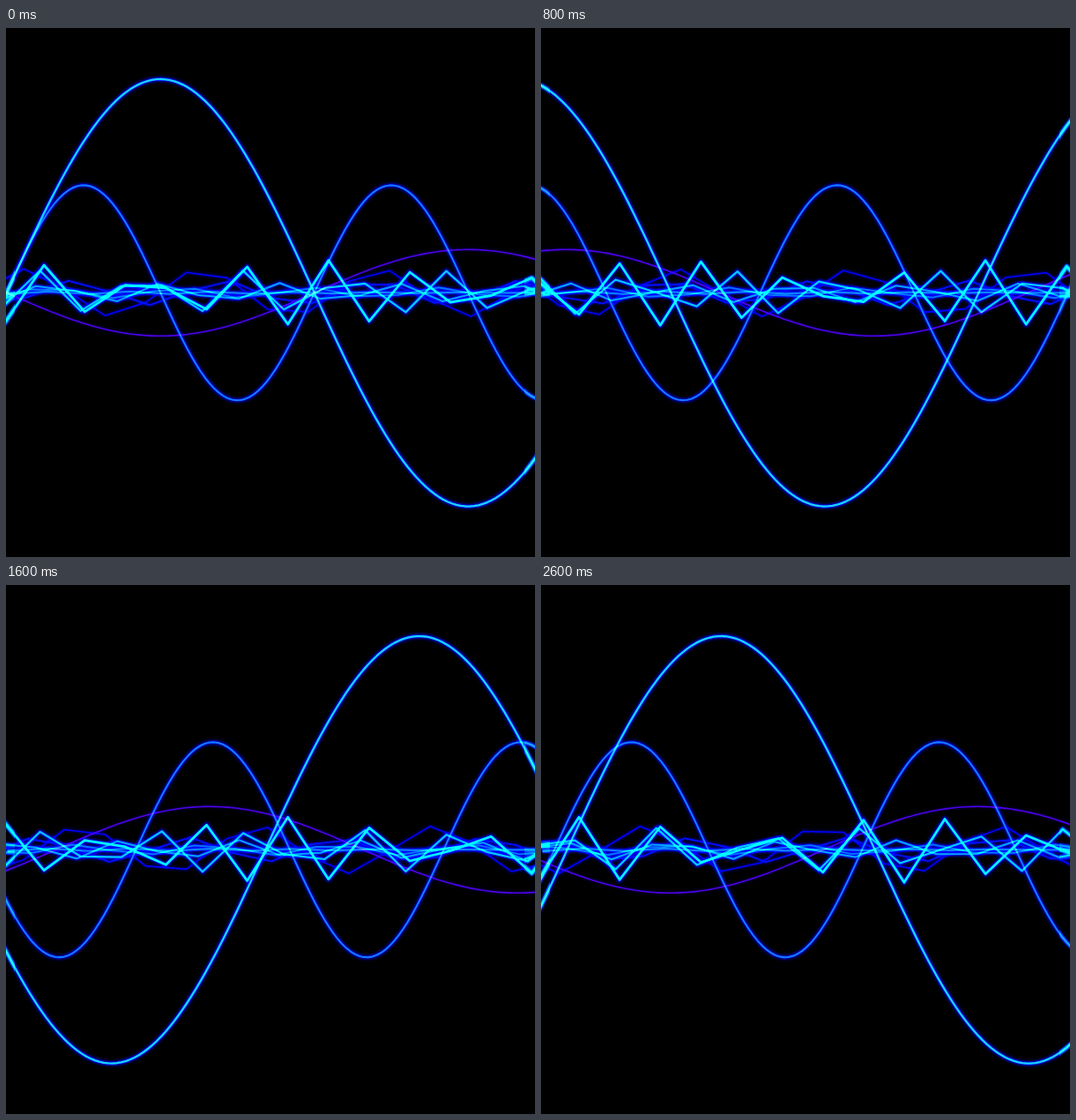
Write an HTML page that moves like this. It is 600 px wide and 600 px high and loops after 2.66 s.

```html
<!DOCTYPE html>
<html lang="en">
<head>
<meta charset="utf-8">
<title>Waves</title>
<style>
  html, body { margin: 0; width: 100%; height: 100%; overflow: hidden; background: #000; }
  svg { display: block; width: 100vw; height: 100vh; }
  path { fill: none; stroke-linejoin: round; mix-blend-mode: plus-lighter; }
</style>
</head>
<body>
<svg id="stage" viewBox="0 0 600 600">
  <clipPath id="edges"><path d="M0 0H10V600H0ZM588 0H600V600H588Z"/></clipPath>
</svg>
<script>
const stage = document.getElementById('stage');
const LOOP = 2660, MID = 300.3, TAU = Math.PI * 2;
const SMOOTH_RATE = 0.14006, COARSE_RATE = 0.1335;
const GAP = 46.1;

// Smooth waves: amplitude, wavelength, direction
const smooth = [
  { amp: 49, len: 698, dir: -1, color: '#5000c8', width: 1.6, glow: 0.2 },
  { amp: -122, len: 349, dir: 1, color: '#1480ff', width: 1.9, glow: 0.9 },
  { amp: -242.3, len: 698, dir: 1, color: '#18d4ff', width: 2.3, glow: 1 }
];

// Coarsely sampled waves: the order n sets frequency, speed and offset
const coarse = [
  { n: 6, amp: 27, phase: -1.67, color: '#0000c8', width: 1.6, glow: 0.35 },
  { n: 5, amp: 14, phase: 0.5, color: '#0010d8', width: 1.6, glow: 0.45 },
  { n: 4, amp: 6, phase: -0.3, color: '#0078ff', width: 1.9, glow: 0.9 },
  { n: 0, amp: 1.5, phase: 0, color: '#0a80ff', width: 2.2, glow: 1 },
  { n: 3, amp: 11, phase: -0.1, color: '#00a4ff', width: 2, glow: 0.9 },
  { n: 2, amp: 25, phase: -0.69, color: '#00ccff', width: 2.2, glow: 1 },
  { n: 1, amp: 37, phase: 0.177, color: '#00f8ff', width: 2.7, glow: 1 }
];

function stroke(color, width, opacity, clip) {
  const p = document.createElementNS('http://www.w3.org/2000/svg', 'path');
  p.setAttribute('stroke', color);
  p.setAttribute('stroke-width', width);
  p.setAttribute('stroke-opacity', opacity);
  if (clip) p.setAttribute('clip-path', 'url(#edges)');
  stage.appendChild(p);
  return p;
}

for (const w of [...smooth, ...coarse]) {
  w.paths = [
    stroke('#00f', w.width + 8, 0.1 * w.glow),
    stroke('#00f', w.width + 5, 0.18 * w.glow),
    stroke('#00f', w.width + 2.4, 0.42 * w.glow),
    stroke(w.color, w.width, 1),
    stroke(w.color, w.width + 3, 0.4 * w.glow, true)
  ];
}

function setPoints(wave, points) {
  const d = 'M' + points.map(([x, y]) => x.toFixed(1) + ' ' + y.toFixed(2)).join('L');
  for (const p of wave.paths) p.setAttribute('d', d);
}

// Uneven stepping: nine pictures cover ten steps every 600 ms
const TICKS = [[0, 0], [70, 2], [100, 3], [200, 4], [270, 5], [300, 6], [400, 7], [470, 8], [500, 9]];
function stepAt(t) {
  if (t < 100) return 0;
  if (t < 200) return 2;
  const u = (t - 100) % 600;
  let s = 0;
  for (const [at, value] of TICKS) if (u >= at) s = value;
  return Math.floor((t - 100) / 600) * 10 + s;
}

function draw(step) {
  for (const w of smooth) {
    const pts = [];
    for (let x = -10; x <= 610; x += 5) {
      const angle = TAU * x / w.len + w.dir * SMOOTH_RATE * step;
      pts.push([x + 0.7, MID + w.amp * Math.sin(angle)]);
    }
    setPoints(w, pts);
  }
  for (const w of coarse) {
    const pts = [];
    const freq = 3.264 + 0.263 * w.n;
    for (let k = 0; k < 15; k++) {
      const angle = freq * k + COARSE_RATE * w.n * step + w.phase;
      pts.push([1.6 - 4.6 * w.n + GAP * k, MID + w.amp * Math.cos(angle)]);
    }
    setPoints(w, pts);
  }
}

let start = null, last = 0;
function tick(now) {
  if (start === null) start = now;
  const step = stepAt(Math.max(0, now - start) % LOOP);
  if (step !== last) draw(last = step);
  requestAnimationFrame(tick);
}
draw(0);
requestAnimationFrame(tick);
</script>
</body>
</html>
```
